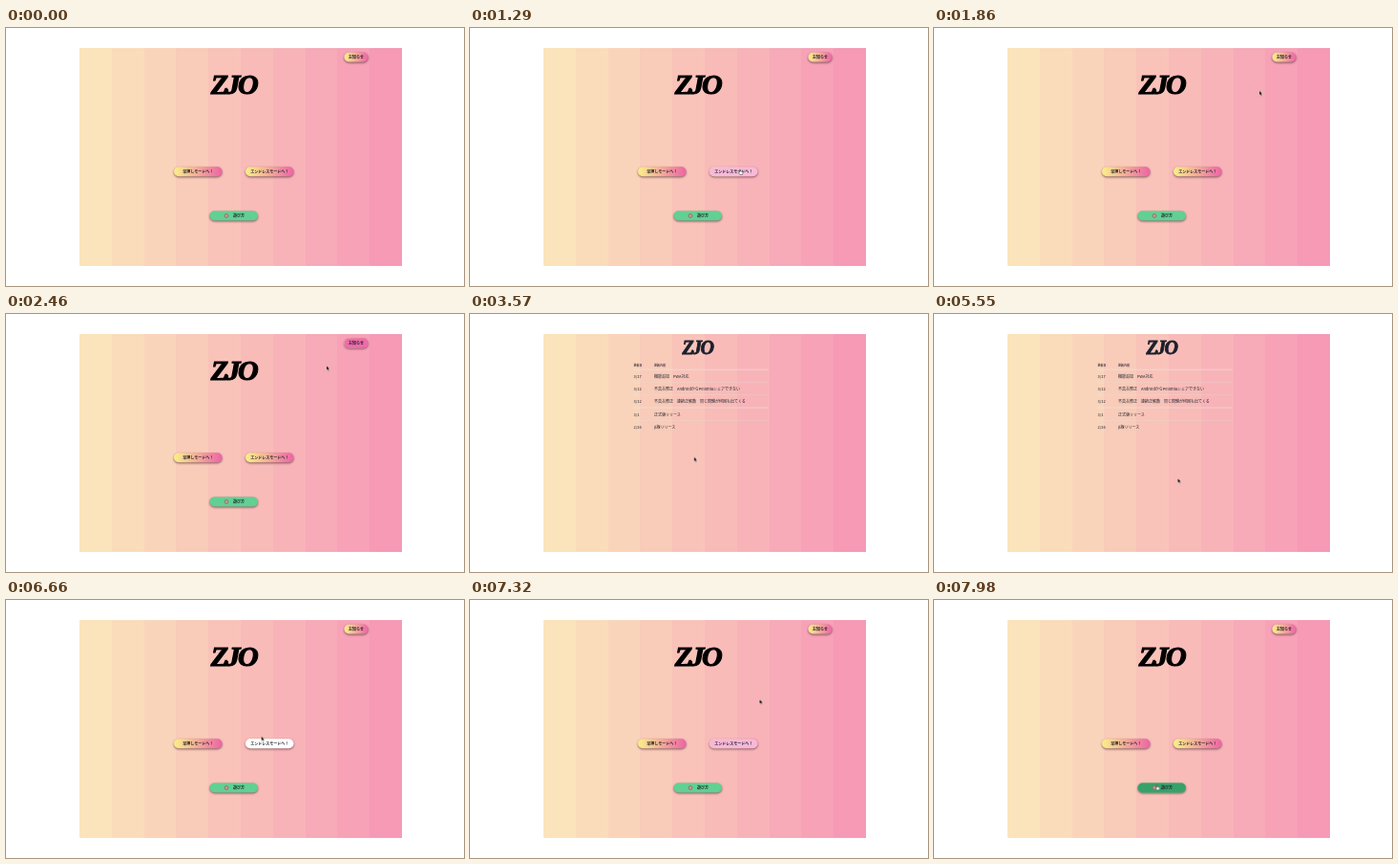
Write an HTML page that moves like this. It is 480 by 270 pixels and loops after 8 s.

```html
<!DOCTYPE html>
<html lang="ja">
<head>
<meta charset="utf-8">
<style>
  html, body { margin: 0; width: 100%; height: 100%; overflow: hidden; background: #fff; }
  svg { display: block; width: 480px; height: 270px; }
  text { font-family: "Noto Sans CJK JP", "Noto Sans CJK", "Noto Sans", sans-serif; fill: #1a202c; }
  .logo { font-family: "Liberation Serif", serif; font-weight: 700; font-style: italic; text-anchor: middle; }
  .button { filter: drop-shadow(0 1.2px 1px rgba(50, 20, 35, .6)); }
  .label { font-size: 4px; font-weight: 600; text-anchor: middle; }
  .cell { font-size: 4px; }
  .head { font-size: 3px; font-weight: 600; fill: #4a4048; }
</style>
</head>
<body>
<svg viewBox="0 0 480 270">
  <defs>
    <linearGradient id="sunrise">
      <stop offset="0" stop-color="#faf089"/>
      <stop offset="1" stop-color="#ed64a6"/>
    </linearGradient>
  </defs>
  <g id="bands" shape-rendering="crispEdges"></g>
  <g id="home">
    <text class="logo" x="238.4" y="69" font-size="30" letter-spacing="-2.6"
      style="fill:#000" stroke="#000" stroke-width="1.2">ZJO</text>
  </g>
  <g id="news">
    <text class="logo" x="238.4" y="42.3" font-size="20" letter-spacing="-1.6"
      stroke="#1a202c" stroke-width=".8">ZJO</text>
  </g>
  <g id="cursor">
    <path id="arrow" d="M0 0V4.6L1.1 3.7L1.9 5.4L2.7 5L1.9 3.4H3.3Z"
      fill="#000" stroke="#fff" stroke-width=".3"/>
    <path id="hand" d="M-.5 .3Q0-.4 .5 .3V2L2.6 2.5Q3.2 2.8 3 3.7L2.5 5.4H-.2L-1.7 3.2Q-1.6 2.5-.5 3.2Z"
      fill="#fff" stroke="#111" stroke-width=".45"/>
  </g>
</svg>
<script>
const DURATION = 8000, FADE = 200;
const $ = id => document.getElementById(id);

function add(parent, tag, attrs, content = '') {
  const el = document.createElementNS('http://www.w3.org/2000/svg', tag);
  for (const [name, value] of Object.entries(attrs)) el.setAttribute(name, value);
  el.textContent = content;
  parent.append(el);
  return el;
}

// steps: [time, value] with times strictly inside the loop, ends are held
function loop(el, property, steps) {
  const all = [[0, steps[0][1]], ...steps, [DURATION, steps.at(-1)[1]]];
  el.animate(all.map(([time, value]) => ({ offset: time / DURATION, [property]: value })),
    { duration: DURATION, iterations: Infinity });
}

// Hard switch of opacity inside the given [start, end] spans; no end means until the loop ends
function toggle(el, spans, inside = 1) {
  const outside = 1 - inside;
  loop(el, 'opacity', spans.flatMap(([start, end]) => [
    [start, outside], [start, inside],
    ...(end ? [[end, inside], [end, outside]] : [])
  ]));
}

// Background: equal bands between two colours
const BANDS = 10, BAND_WIDTH = 33.8;
const warm = [251, 228, 187], rose = [246, 154, 182];
for (let i = 0; i < BANDS; i++) {
  const color = warm.map((c, k) => Math.round(c + (rose[k] - c) * i / (BANDS - 1)));
  add($('bands'), 'rect', { x: 77 + i * BAND_WIDTH, y: 21, width: BAND_WIDTH, height: 228, fill: `rgb(${color})` });
}

// Buttons
function button({ x, y, width = 50.5, label, labelX = x + width / 2, fill = 'url(#sunrise)',
  base = '#ed64a6', over = '#ffffff', hover }) {
  const group = add($('home'), 'g', {});
  const box = { x, y, width, height: 10, rx: 5 };
  add(group, 'rect', { ...box, fill, class: 'button' });
  if (hover) {
    const [start, end] = hover;
    const cover = add(group, 'rect', { ...box, fill: base });
    toggle(cover, [[start, end && end + FADE]]);
    const fadeIn = [[start, base], [Math.min(start + FADE, DURATION - 20), over]];
    loop(cover, 'fill', end ? [...fadeIn, [end, over], [end + FADE, base]] : fadeIn);
  }
  add(group, 'text', { x: labelX, y: y + 6.3, class: 'label' }, label);
  return group;
}

const newsHover = [1980, 2270], helpHover = [7830];
const endlessVisits = [[1180, 1560], [6350, 7230]];
button({ x: 354.5, y: 25.5, width: 25, label: 'お知らせ', hover: newsHover });
button({ x: 176, y: 145.3, label: '早押しモードへ！' });
const newsPage = [2560, 6180];
const endless = { x: 251, y: 145.3, label: 'エンドレスモードへ！' };
endlessVisits.forEach((hover, i) => {
  const visit = button({ ...endless, hover });
  toggle(visit, [newsPage.slice(0, 1)], i);
});
const help = button({ x: 213.5, y: 191.5, label: '遊び方', labelX: 244,
  fill: '#62d092', base: '#62d092', over: '#38a169', hover: helpHover });
add(help, 'circle', { cx: 231, cy: 196.5, r: 1.9, fill: '#cf9a98', stroke: '#8c6268', 'stroke-width': .8 });

// News table
const rows = [
  ['3/17', '機能追加　PWA対応'],
  ['3/12', '不具合修正　AndroidからPelomiaシェアできない'],
  ['3/12', '不具合修正　連続正解数　同じ問題が何回も出てくる'],
  ['3/1', '正式版リリース'],
  ['2/26', 'β版リリース']
];
function tableRow(cells, y, kind) {
  cells.forEach((cell, i) => add($('news'), 'text', { x: i ? 193 : 171.5, y, class: kind }, cell));
}
tableRow(['更新日', '更新内容'], 54.6, 'head');
rows.forEach((row, i) => {
  const y = 66.8 + 13.3 * i;
  tableRow(row, y, 'cell');
  add($('news'), 'rect', { x: 171, y: y - 9, width: 142, height: .7,
    fill: '#e5e8e6', opacity: i % 3 ? .35 : .85 });
});

// Pages
toggle($('news'), [newsPage]);
toggle($('home'), [newsPage], 0);

// Pointer: it rests between moves of { from, to } times
const moves = [
  { from: 490, to: 1260, x: 283, y: 148 },
  { from: 1400, to: 2060, x: 366, y: 30 },
  { from: 2220, to: 2460, x: 336, y: 54 },
  { from: 2460, to: 3570, x: 234.6, y: 149.5 },
  { from: 3570, to: 3810, x: 284, y: 150 },
  { from: 3990, to: 4600, x: 225, y: 193 },
  { from: 4600, to: 5550, x: 255.5, y: 172 },
  { from: 6120, to: 6660, x: 267.6, y: 142.6 },
  { from: 7140, to: 7480, x: 335, y: 70 },
  { from: 7480, to: 7920, x: 233.6, y: 193.5 }
];
let place = 'translate(84px, 170px)';
loop($('cursor'), 'transform', moves.flatMap(({ from, to, x, y }) => {
  const start = place;
  place = `translate(${x}px, ${y}px)`;
  return [[from, start], [to, place]];
}));
const handSpans = [endlessVisits[0], newsHover, helpHover];
toggle($('cursor'), [[moves[0].from]]);
toggle($('hand'), handSpans);
toggle($('arrow'), handSpans, 0);
</script>
</body>
</html>
```
